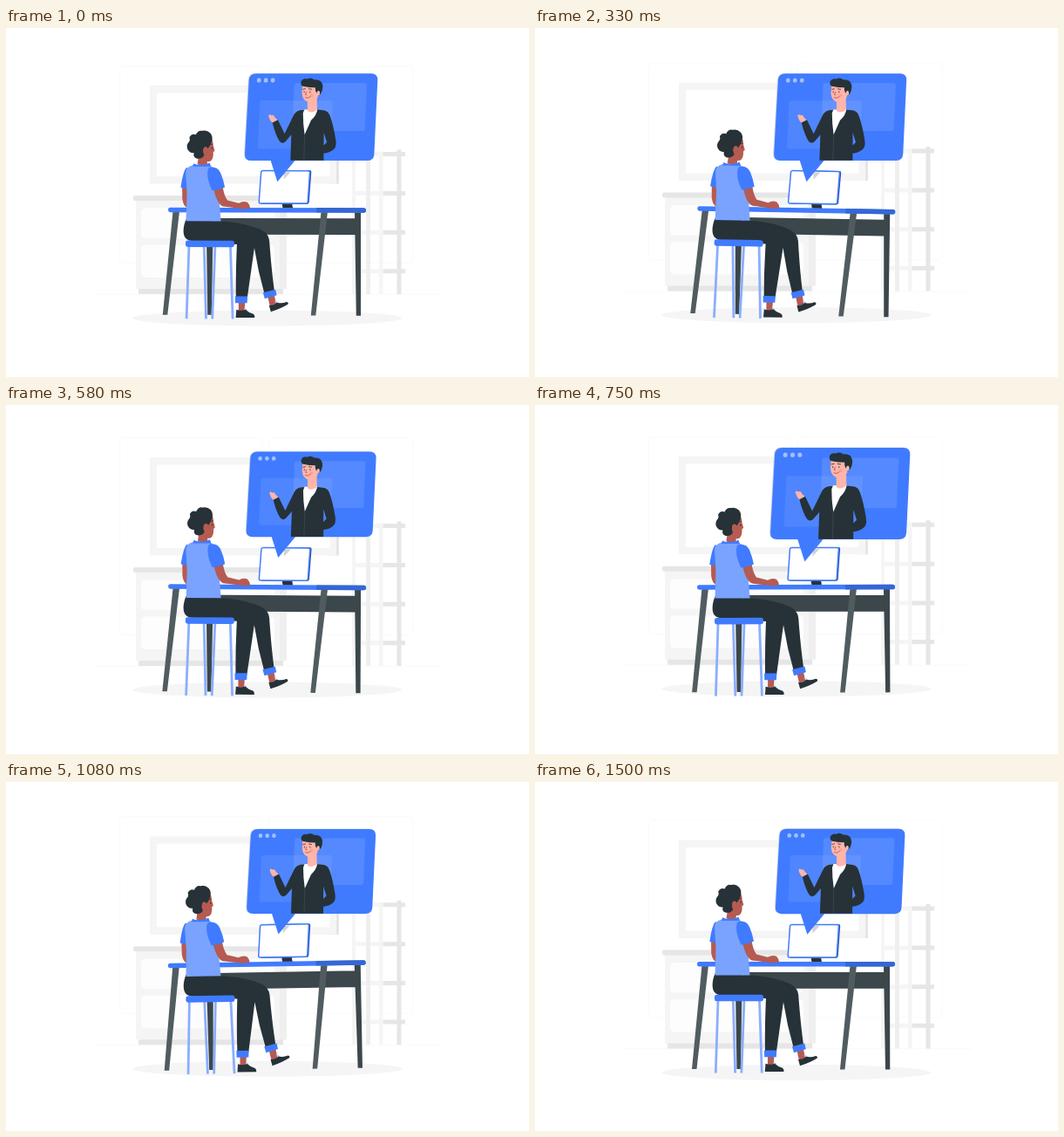
Animation of 600 by 400 pixels, one loop 1.54 s. Source, as an HTML page:

```html
<!DOCTYPE html>
<html lang="en">
<head>
<meta charset="utf-8">
<title>Video call</title>
<style>
  html, body { margin: 0; width: 100%; height: 100%; overflow: hidden; background: #fff; }
  svg { display: block; width: 600px; height: 400px; }
  .blue { fill: #407bff; }
  .sky { fill: #7aa3ff; }
  .ink { fill: #263238; }
  .steel { fill: #3c474c; }
  .iron { fill: #515c61; }
  .brown { fill: #b55b52; }
  .pink { fill: #ffb5a9; }
  .pale { fill: #f5f5f5; }
  .grey { fill: #e6e6e6; }
  .line { fill: none; stroke-linecap: round; stroke-linejoin: round; }
</style>
</head>
<body>
<svg viewBox="0 0 600 400">
  <g id="room">
    <g class="line" stroke="#ebebeb" stroke-width=".25">
      <rect x="130.6" y="44" width="163.5" height="226" rx="4.5"/>
      <rect x="301.5" y="44" width="165.5" height="226" rx="4.5"/>
      <path d="M100 305.8H500"/>
    </g>
    <ellipse class="pale" cx="300" cy="333" rx="154.5" ry="9"/>

    <path class="grey" d="M370 66.5H382V179H370Z"/>
    <path class="pale" d="M165 66.5H379V179H165Z"/>
    <path fill="#fff" d="M173 75H371.500V170.500H173Z"/>

    <path class="grey" d="M152 298H318V305.500H152Z"/>
    <path fill="#efefef" d="M300 198H322V299.500H300Z"/>
    <path class="pale" d="M149 198H314V299.500H149Z"/>
    <g fill="#fdfdfd">
      <rect x="155" y="207" width="153" height="34.500" rx="5"/>
      <rect x="155" y="249" width="153" height="37.500" rx="5"/>
    </g>
    <path class="grey" d="M148 192.500H324V198.500H148Q146 198.500 146 195.500T148 192.500Z"/>

    <path class="pale" d="M397 142H401V305.500H397ZM428 142H432.500V305.500H428Z"/>
    <path id="rungsLeft" class="pale" d="M397 142.500h35v5h-35zm0 45h35v5h-35zm0 44.700h35v5h-35zm0 44.500h35v5h-35z"/>
    <path fill="#efefef" d="M413 142H418V305.500H413Z"/>
    <path class="grey" d="M448.500 140H453.500V305.500H448.500ZM432.500 142.500h25.500v5h-25.500zm0 45h25.500v5h-25.500zm0 44.700h25.500v5h-25.500zm0 44.500h25.500v5h-25.500z"/>
  </g>

  <g id="desk">
    <!-- table -->
    <path class="steel" d="M230 240H237.500L236 329H231.500ZM400 211H407L407.300 329.500H402ZM240 218H401V236.800H240Z"/>
    <path class="iron" d="M191.500 210H199L185.500 329H180ZM361.500 210H369L355.500 329.500H350Z"/>
    <path class="ink" d="M316.500 200.500H328L329 206.500H317.500Z"/>
    <path fill="#2d56b3" d="M296 163H348.500Q350.300 163 350.200 165L347.800 199.500Q347.600 201.800 345 201.800H293Z"/>
    <path d="M294.700 163.600H346.500Q348.500 163.600 348.400 165.500L346.200 198.800Q346 201 344 201H292Q290 201 290.200 198.800L292.500 165.500Q292.700 163.600 294.700 163.600Z" fill="#fff" stroke="#407bff" stroke-width="1.500"/>
    <path fill="#d2d2d2" d="M318.500 165H326.500L318.500 173.500Z"/>
    <rect class="blue" x="186" y="206" width="227" height="5.500" rx="2.500"/>
    <path fill="#3567d4" d="M356 206H410.500Q413 206 413 208.800T410.500 211.500H356Z"/>

    <!-- stool legs -->
    <path class="line" style="stroke-linecap:butt" stroke="#8aaeff" stroke-width="2.800" d="M210 250L207.300 333.500M227.300 250L229.700 333.500M240 250L236.900 333.500M257.500 250L260.300 333.500"/>

    <!-- legs and shoes -->
    <path class="brown" d="M267 313H274.500L273.700 325H267ZM300.500 308L308 306L310 316L303 319Z"/>
    <path class="line" stroke="#a6c1ff" stroke-width="1" d="M273.800 321.500L276.500 323M308.800 313L312 314.500"/>
    <path class="ink" d="M264.500 322.800Q270 325 275 322.700Q279 326.500 284 327.700Q286 329 285.500 332H263.800Z"/>
    <path class="ink" d="M302 318Q307 318.500 311 314.700Q317 316 322 313.900Q324.500 314 323.800 316.500Q316 321.500 304 325.300Z"/>
    <path class="ink" d="M206.500 219.500C203 228 202.500 237 206 241Q209 244.500 216 244.500L265 248Q263.500 278 264 309H277L285 252Q289 278 296.500 304L308 301Q304.500 276 302.200 244Q301.500 235.500 292 231Q272 222.500 246 221.500Z"/>
    <path class="blue" d="M263 307.500H277.300L276.800 315.200H263.200ZM295 303.300L309.300 299.600L310.800 306.200L297 310.300Z"/>
    <rect class="blue" x="206" y="243.800" width="56" height="7.500" rx="2.500"/>

    <!-- torso and arms -->
    <path class="brown" d="M202 181H208.500V206.500Q203.500 205 202.200 196Z"/>
    <path class="blue" d="M207 160Q203 164 200.300 183L207 184.500L213 165Z"/>
    <path class="sky" d="M206 166Q206.500 159.500 214 157.500L233 157.500Q240 160 242.500 172L246.500 221.500H206.500L207.500 190Z"/>
    <path class="brown" d="M238 184L248.500 181.500Q250 192 254 197.500L267 200.800Q272 197.800 277 199.800Q280 203 280 206.500Q274 208 267 206.700L249 204.500Q242 202 238 184Z"/>
    <path class="blue" d="M233 160Q242 158 246 166Q249.500 174 251 182.500Q244 186 236.500 186.500Q231 176 231 167Q231 162 233 160Z"/>

    <!-- head -->
    <path class="brown" d="M221 146H231.500L230.500 157Q225 161 219.500 156Z"/>
    <path class="blue" d="M215 155.300Q218 157 223 157Q229 157 233.500 154.700L235 159H214Z"/>
    <path class="brown" d="M223 129L236 127Q237.500 130.500 237.500 134.500L239.300 140.700L237.600 142.300Q238 150 234.500 152.600Q229 154.500 221.500 149.500Z"/>
    <path class="ink" d="M235.800 130.500Q237.500 124 234 120.500Q230 116.500 225 118Q220 116.800 217.500 122.500Q213 120.700 210.200 125.500Q211.500 129.500 209 131.500Q206.500 135 208 139Q210.500 143.800 215.500 143.500Q214 148.500 219 149.800Q225 150.500 227.200 146Q224.500 141 227.500 137Q230.500 136 231.500 138.500Q234.500 134.500 235.800 130.500Z"/>
    <ellipse class="brown" cx="228.800" cy="140.500" rx="2.700" ry="4"/>
    <path class="line" stroke="#263238" stroke-width=".8" d="M234.300 133.700L236.800 133.200M236 137V138.500"/>
  </g>

  <g id="bubble">
    <path fill="#cdd5e6" transform="translate(-.9 -.4)" d="M289 54H417Q424.500 54 424.100 61.500L420.300 143.500Q419.900 151 412.500 151H283.500Q275.800 151 276.200 143.500L280.800 61.500Q281.300 54 289 54Z"/>
    <path class="blue" d="M289 54H417Q424.500 54 424.100 61.500L420.300 143.500Q419.900 151 412.500 151H332L312.500 174.500L305 151H283.500Q275.800 151 276.200 143.500L280.800 61.500Q281.300 54 289 54Z"/>
    <path fill="#fff" fill-opacity=".1" d="M333.500 64.500H409.500Q412.300 64.500 412.200 67L410 115.500Q409.900 118 407 118H331.500Q329 118 329.100 115.500L331 67Q331.100 64.500 333.500 64.500Z"/>
    <path fill="#fff" fill-opacity=".08" d="M295.500 84H371.500Q374.200 84 374.100 86.500L372 135Q371.900 137.500 369.200 137.500H293Q290.600 137.500 290.700 135L293 86.500Q293.100 84 295.500 84Z"/>
    <g fill="#a5c0ff">
      <ellipse cx="292" cy="61.500" rx="2.300" ry="2.500"/>
      <ellipse cx="299.700" cy="61.500" rx="2.300" ry="2.500"/>
      <ellipse cx="307.400" cy="61.500" rx="2.300" ry="2.500"/>
    </g>

    <!-- caller -->
    <path class="pink" d="M306.500 108.500Q304 106 303 102.500Q302 100 304 99.600L306 100.500Q308.500 99.500 309.500 102.500L313 106Z"/>
    <path class="pink" d="M362 138.500L355 138.800Q350.500 141 350.500 144L353 143.800L354.500 145.600Q360 145.600 363 142.500Z"/>
    <path class="ink" d="M341 94.500Q334 94.500 331 99.500L320.500 121L313 105.500L307 109Q310.500 123 315 129.500Q318.500 133 322 129L328 122L327 150.700H364L364.200 119.500L367.500 130.500L360.500 137.500L363 143Q372 142 376 137.500Q378.500 134.500 377.500 128Q374.500 110 371 101Q369 95 363 94.800L357 94.200Z"/>
    <path fill="#fff" d="M342.500 94L357 93.500Q356.500 100 350 106L342.800 122Q341 110 341 98Z"/>
    <path class="pink" d="M346 82H356.500L356.700 94Q351 99 346 95.500Z"/>
    <path class="line" stroke="#465157" stroke-width=".6" d="M342.800 122L342 150.500"/>
    <path class="pink" d="M340.500 67H358L357.500 80Q355 87 347.500 85.800Q340.500 84.500 339.800 76Z"/>
    <circle class="pink" cx="358.300" cy="75.500" r="2.600"/>
    <path class="ink" d="M341 68Q337.800 67 339 62.500Q341 58.800 345.500 60Q350 57.700 353.500 60.800Q362 60 363 67.500Q363.300 74 359.300 78.500Q360.800 73.500 358 73Q356.500 74 356.200 76Q354.500 74 354.700 69.500Q348 69.500 341 68Z"/>
    <g class="line" stroke="#263238" stroke-width=".8">
      <path d="M341 71.500L343.500 71M347.500 71L350.500 71.500M342.300 74V75M348.900 74V75"/>
      <path stroke="#b54f4a" d="M344.800 74.500L343.700 77.500L345 77.800M343.500 80.800Q346.500 82.300 349.500 79.500"/>
    </g>
    <circle cx="350.500" cy="78.200" r="1.700" fill="#ff8f87" fill-opacity=".6"/>
  </g>
</svg>
<script>
  const PERIOD = 1540, LEAD = 45;
  const [room, desk, bubble] = ["room", "desk", "bubble"].map(id => document.getElementById(id));

  // Linear interpolation through [position, value] stops.
  function track(stops, p) {
    const i = stops.findIndex(([at]) => p <= at);
    if (i < 1) return stops[0][1];
    const [a, from] = stops[i - 1], [b, to] = stops[i];
    return from + (to - from) * (p - a) / (b - a);
  }

  const lift = [[0, 0], [.5, -8], [1, 0]];
  const sway = [[0, 0], [.25, 1], [.75, -1], [1, 0]];
  const beat = [[0, 1], [.1, 1.1], [.3, 1], [.4, 1], [.5, 1.1], [.6, 1], [1, 1]];

  function draw(now) {
    const p = (now + LEAD) / PERIOD % 1;
    room.setAttribute("transform", `translate(0 ${track(lift, p)})`);
    desk.setAttribute("transform", `rotate(${track(sway, p)} 297 226)`);
    bubble.setAttribute("transform", `translate(350 114) scale(${track(beat, p)}) translate(-350 -114)`);
    requestAnimationFrame(draw);
  }
  draw(performance.now());
</script>
</body>
</html>
```
